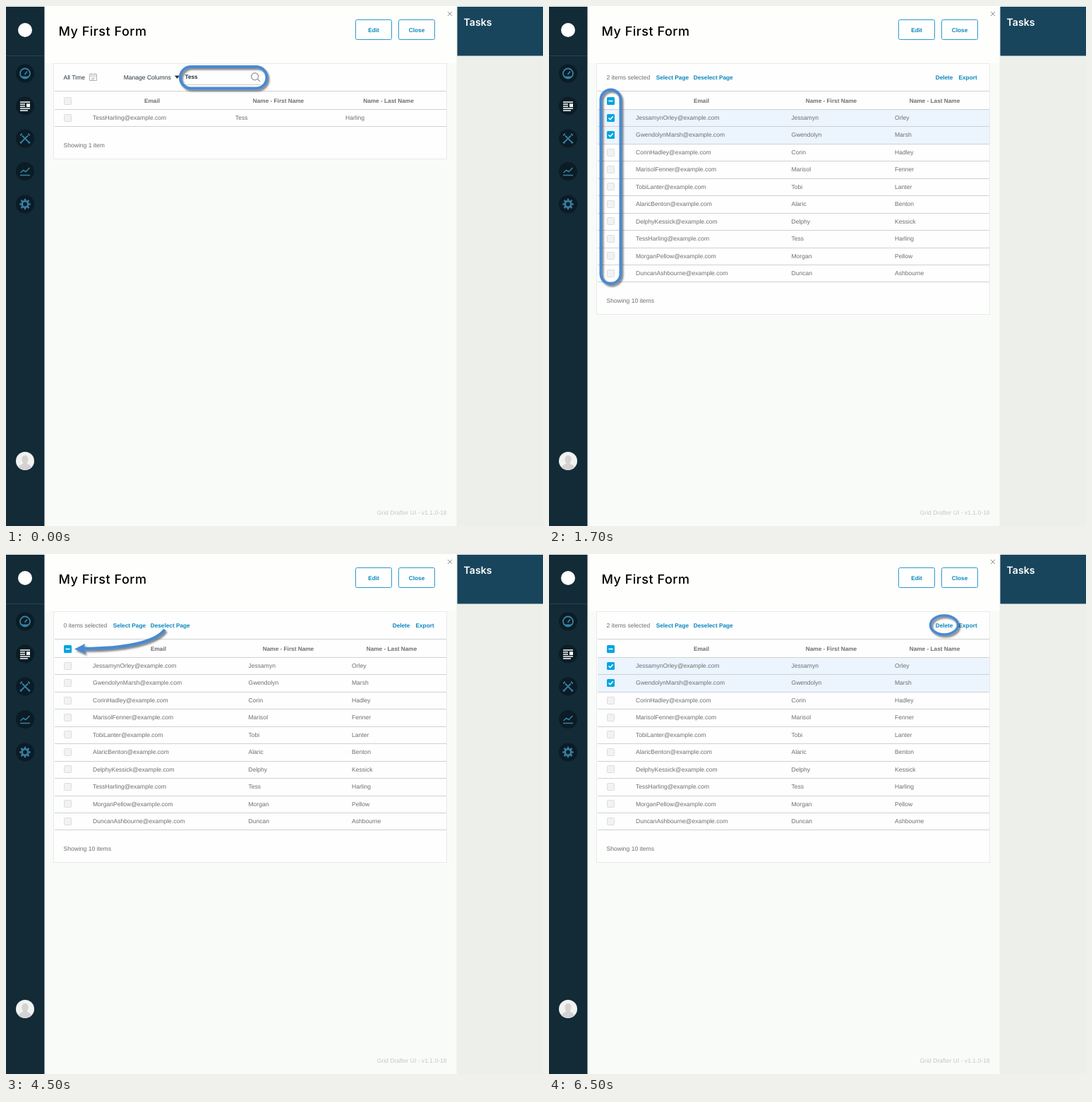
Recreate the animation shown at these times as an HTML page. Size 761 px wide and 736 px high, loop 8 s.

```html
<!DOCTYPE html>
<html lang="en">
<head>
<meta charset="utf-8">
<title>My First Form</title>
<style>
  html, body { margin: 0; width: 100%; height: 100%; overflow: hidden; background: #f9fbf8; }
  svg { display: block; }
  text { font: 8.55px "Liberation Sans", Arial, sans-serif; fill: #6c6f71; text-rendering: geometricPrecision; }
  .b { font-weight: 700; font-size: 8.25px; }
  .link { fill: #0a87be; }
  .dark { fill: #26333b; }
  .mid { text-anchor: middle; }
  .h { font-family: Inter, "Open Sans", sans-serif; }
  .rule { stroke: #cfd1d0; }
  .icon { fill: none; stroke: #3a7fa4; stroke-width: 1.8; }
  .mark { fill: none; stroke: #4a8ad0; stroke-width: 4; }
</style>
</head>
<body>
<svg width="761" height="736" viewBox="0 0 761 736">
  <defs>
    <filter id="shade" filterUnits="userSpaceOnUse" x="54" y="70" width="590" height="350">
      <feDropShadow dx="2" dy="2.5" stdDeviation="1.2" flood-color="#333" flood-opacity=".6"/>
    </filter>
    <circle id="disc" r="13" fill="#0b1c25"/>
  </defs>

  <rect width="761" height="736" fill="#f9fbf8"/>
  <rect width="761" height="81" fill="#fefefd"/>
  <rect y="1" width="54.5" height="735" fill="#132a37"/>
  <path d="M0 70.5H54" stroke="#2c424e"/>
  <rect x="638.5" y="1" width="122.5" height="735" fill="#edefea"/>
  <rect x="639.5" y="1" width="121.5" height="69.5" fill="#19455c"/>
  <text class="h" x="648.5" y="27.5" style="font-size:14.2px;font-weight:600;fill:#fff">Tasks</text>

  <circle cx="27" cy="34" r="10" fill="#fff"/>

  <g transform="translate(27 95.5)"><use href="#disc"/>
    <circle class="icon" r="7"/>
    <path class="icon" d="M-.5 1.5L3-3"/>
    <path d="M-6 4H6A7 7 0 0 1-6 4z" fill="#3a7fa4"/></g>
  <g transform="translate(27 141.5)"><use href="#disc"/>
    <path d="M-7-5.500H7M-7-2.500H0M-7 .5H0M-7 3.500H7M-7 6.500H4" stroke="#fff" stroke-width="1.7"/>
    <path d="M2-3.300H7V1.500H2z" fill="#fff"/></g>
  <g transform="translate(27 187.5)"><use href="#disc"/>
    <path class="icon" d="M-4-4L5.500 5.500M4-4L-5.500 5.500M-7-4.500A3 3 0 0 0-4.500-7M7-4.500A3 3 0 0 1 4.500-7M-7 5L-5 7M7 5L5 7"/></g>
  <g transform="translate(27 234)"><use href="#disc"/>
    <path class="icon" style="stroke-width:1.5" d="M-7 5.500H7M-6.500 2L-2.500-1.500L1 .5L6.500-5"/></g>
  <g transform="translate(27 280.5)"><use href="#disc"/>
    <circle class="icon" r="4.3" style="stroke-width:2.8"/>
    <circle class="icon" r="6.5" style="stroke-width:2.4" pathLength="16" stroke-dasharray="1 1" stroke-dashoffset=".5"/></g>
  <g transform="translate(27 644)">
    <circle r="13" fill="#f2f2f1"/>
    <path d="M-9 9C-8 5-3 5-2.500 3C-6-1-5-8 0-8S6-1 2.500 3C3 5 8 5 9 9A13 13 0 0 1-9 9z" fill="#d2d3d2"/></g>

  <text class="h" x="74.5" y="41.5" style="font-size:18px;font-weight:500;letter-spacing:.5px;fill:#000">My First Form</text>
  <g fill="#fff" stroke="#2d9acb">
    <rect x="495.5" y="19.5" width="51" height="28" rx="2"/>
    <rect x="556.5" y="19.5" width="51" height="28" rx="2"/>
  </g>
  <text class="b link mid" x="521" y="37">Edit</text>
  <text class="b link mid" x="582" y="37">Close</text>
  <path d="M626 8L632 14M632 8L626 14" stroke="#8d9092"/>
  <text x="624.5" y="719.5" text-anchor="end" style="fill:#c6c8c7">Grid Drafter UI - v1.1.0-18</text>
  <g id="view"></g>
</svg>
<script>
const people = ["Jessamyn Orley", "Gwendolyn Marsh", "Corin Hadley", "Marisol Fenner", "Tobi Lanter",
  "Alaric Benton", "Delphy Kessick", "Tess Harling", "Morgan Pellow", "Duncan Ashbourne"];
const PITCH = 24.44;

const text = (x, y, s, cls = "") => `<text class="${cls}" x="${x}" y="${y}">${s}</text>`;
const rule = y => `<path class="rule" d="M69 ${y}H624"/>`;

// mark: "" empty, "tick" or "dash"
function box(y, mark) {
  const glyph = { tick: "M-3 0L-.8 2.200L3.200-2.200", dash: "M-3 0H3" }[mark];
  return `<g transform="translate(87.5 ${y})">` + (glyph
    ? `<rect x="-5.5" y="-5.5" width="11" height="11" rx="1.5" fill="#02a5df"/>
       <path d="${glyph}" fill="none" stroke="#fff" stroke-width="1.6"/>`
    : `<rect x="-5" y="-5" width="10" height="10" rx="1" fill="#f1f2f1" stroke="#dcdedd"/>`) + "</g>";
}

function table(names, picked, head, titles, cols) {
  const end = Math.round(146 + PITCH * names.length);
  let out = `<rect x="67.5" y="81.5" width="557" height="${end + 46 - 81}" fill="#fefefe" stroke="#e9ebe9"/>`;
  out += rule(120.5) + rule(146.5) + box(134.5, head);
  ["Email", "Name - First Name", "Name - Last Name"].forEach((s, i) => out += text(titles[i], 136.7, s, "b mid"));
  names.forEach((name, i) => {
    const [first, last] = name.split(" ");
    const top = Math.round(146 + PITCH * i), bottom = Math.round(146 + PITCH * (i + 1));
    const y = 158.2 + PITCH * i;
    if (i < picked) out += `<rect x="69" y="${top + 1}" width="555" height="${bottom - top - 1}" fill="#ecf4fd"/>`;
    out += rule(bottom + .5) + box(Math.floor(y) + .5, i < picked ? "tick" : "");
    [first + last + "@example.com", first, last].forEach((s, k) => out += text(cols[k], y + 2.8, s));
  });
  const n = names.length;
  return out + text(81.5, end + 30, `Showing ${n} item${n > 1 ? "s" : ""}`);
}

function selection(picked, head) {
  const shift = picked > 9 ? 3 : 0;
  return table(people, picked, head, [216, 400, 546.5], [123, 343.5, 490])
    + text(81.5, 104, picked + " items selected")
    + text(151.7 + shift, 104, "Select Page", "b link")
    + text(204.7 + shift, 104, "Deselect Page", "b link")
    + text(547.7, 104, "Delete", "b link")
    + text(580.5, 104, "Export", "b link");
}

function search() {
  return table([people[7]], 0, "", [207, 386, 542], [123, 325, 481])
    + text(81.5, 104, "All Time", "dark") + text(166.7, 104, "Manage Columns", "dark")
    + `<path d="M118.500 96.500H128.500V105.500H118.500zM118.500 99H128.500M121 95V97M126 95V97M121 102H126.500M121 104H125"
        fill="none" stroke="#b3b5b5"/>
      <path d="M239 98.500H246L242.500 103z" fill="#26333b"/>
      <path d="M251 111.500H361" stroke="#c9cbca"/>`
    + text(253.5, 103, people[7].split(" ")[0], "b dark")
    + `<g fill="none" stroke="#a2a4a4" stroke-width="1.5"><circle cx="352.7" cy="99.7" r="5"/><path d="M356.300 103.300L360 107"/></g>`;
}

const shaded = s => `<g filter="url(#shade)">${s}</g>`;
const ring = (x, y, w, h, r) => shaded(`<rect class="mark" x="${x}" y="${y}" width="${w}" height="${h}" rx="${r}"/>`);
const arrow = (curve, tip) => shaded(`<path class="mark" style="stroke-width:4.5" d="${curve}"/>
  <path d="M${tip} 134.500L${tip + 15} 127L${tip + 13.5} 134L${tip + 16} 141.500z" fill="#4a8ad0"/>`);

const scenes = [
  [0, () => search() + ring(247, 86, 122.5, 30.5, 15)],
  [500, () => selection(2, "dash") + ring(73.5, 118.5, 28, 274.5, 14)],
  [2500, () => selection(10, "tick") + arrow("M174 106C168 121 143 133.500 109 134", 96)],
  [4500, () => selection(0, "dash") + arrow("M225 107C212 125.500 166 134 110 134", 97)],
  [6500, () => selection(2, "dash")
    + shaded('<ellipse class="mark" style="stroke-width:3.5" cx="560" cy="100.5" rx="19.5" ry="13.5"/>')]
];

const view = document.getElementById("view");
let shown, start;
function tick(now) {
  start ??= now;
  const t = (now - start) % 8000;
  const scene = scenes.findLast(([from]) => from <= t);
  if (scene !== shown) view.innerHTML = (shown = scene)[1]();
  requestAnimationFrame(tick);
}
requestAnimationFrame(tick);
</script>
</body>
</html>
```
